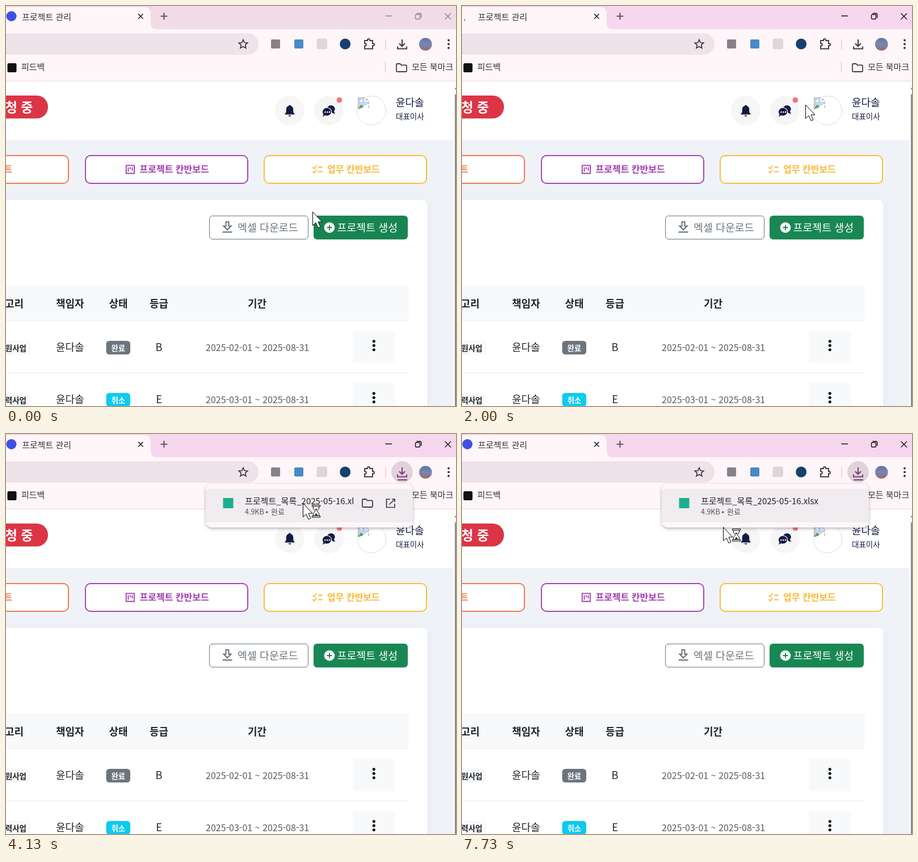
Animation of 793x706 px, one loop 8 s. Source, as an HTML page:

```html
<!DOCTYPE html>
<html lang="ko">
<head>
<meta charset="utf-8">
<title>프로젝트 관리</title>
<style>
html, body { margin: 0; width: 100%; height: 100%; overflow: hidden; background: #fff; }
svg { display: block; }
text { font-family: 'Noto Sans CJK KR', 'Noto Sans CJK', 'Noto Sans', sans-serif; white-space: pre; }
.ui { font-size: 15px; fill: #3a3237; }
.tile { font-size: 16px; font-weight: 700; }
.btn { font-size: 18.4px; }
.head { font-size: 18px; font-weight: 700; fill: #212529; }
.cell { font-size: 18px; fill: #212529; }
.tag { font-size: 13.5px; font-weight: 700; }
.date { font-size: 16px; fill: #555b61; }
.line { fill: none; stroke: #45393f; stroke-width: 2; }
.thin { stroke-width: 1.7; }
.navy { fill: #141b41; }
</style>
</head>
<body>
<svg id="stage" width="793" height="706" viewBox="0 0 793 706">
  <defs>
    <linearGradient id="photo" x1="0" y1="0" x2="0" y2="1">
      <stop offset="0" stop-color="#66739c"/><stop offset=".5" stop-color="#7188b8"/><stop offset="1" stop-color="#a5665e"/>
    </linearGradient>
    <filter id="soft" x="-20%" y="-20%" width="140%" height="140%">
      <feDropShadow dx="0" dy="2" stdDeviation="2.5" flood-color="#403038" flood-opacity=".38"/>
    </filter>
    <filter id="faint" x="-10%" y="-10%" width="120%" height="120%">
      <feDropShadow dx="0" dy="2" stdDeviation="8" flood-color="#54719c" flood-opacity=".08"/>
    </filter>
    <clipPath id="nameClip"><rect id="nameBox" x="420" y="105" width="193" height="24"/></clipPath>
    <path id="tray" d="M0-9V3M-5-2L0 3L5-2M-8 3.5V7.5H8V3.5" fill="none" stroke-width="2.1"/>
    <path id="folder" d="M0 2.2Q0 .5 1.7.5H6.5L8.7 2.8H16.3Q18 2.8 18 4.5V13Q18 14.5 16.3 14.5H1.7Q0 14.5 0 13Z" fill="none" stroke-width="1.8"/>
    <g id="save">
      <path d="M-2.5-9.5H2.5V-2H6.5L0 4.5L-6.5-2H-2.5Z" fill="none" stroke-width="2.1"/>
      <path d="M-8.5 8.5H8.5" stroke-width="2.2"/>
    </g>
    <g id="dots"><circle cy="-7.5" r="2.5"/><circle r="2.5"/><circle cy="7.5" r="2.5"/></g>
  </defs>

  <!-- page -->
  <rect y="134" width="793" height="572" fill="#fff"/>
  <rect y="236" width="788" height="470" fill="#eff3f8"/>
  <rect x="-40" y="158" width="114" height="40.5" rx="20" fill="#dc3545"/>
  <text x="47.5" y="187" text-anchor="end" font-size="23" font-weight="700" fill="#fff">청 중</text>

  <circle cx="500" cy="184.5" r="26" fill="#f6f6f6"/>
  <path class="navy" d="M500 174.5Q501.3 174.5 501.5 176Q506.3 177.3 506.3 183V187.5L508.5 190.5V191.5H491.5V190.5L493.7 187.5V183Q493.7 177.3 498.5 176Q498.7 174.5 500 174.5ZM497.5 193H502.5Q502 195 500 195Q498 195 497.5 193Z"/>
  <circle cx="569" cy="184.5" r="26" fill="#f6f6f6"/>
  <path class="navy" d="M566 180A7 6.5 0 1 1 578 186L580 190Q576 190 573.5 187.5Z"/>
  <path class="navy" stroke="#f6f6f6" stroke-width="1.2" d="M566 179.5A8 7.3 0 1 1 562.5 193.5Q560 195.7 557 195.5L559 191.5A7.8 7.5 0 0 1 566 179.5Z"/>
  <g fill="#fff"><circle cx="562.5" cy="187.3" r="1.2"/><circle cx="566.3" cy="187.3" r="1.2"/><circle cx="570.1" cy="187.3" r="1.2"/></g>
  <circle cx="587.5" cy="166" r="4.8" fill="#f8717b"/>
  <circle cx="644" cy="184.5" r="25.5" fill="#fff" stroke="#dcdcdc"/>
  <path d="M621 162H633L639 168V172L633 176L628 180L621 182Z" fill="#c5d7f4"/>
  <path d="M621 180.5L626 174L630 178L621 182Z" fill="#50a542"/>
  <path d="M621 182V162H633L639 168V180" fill="none" stroke="#a8a8a8" stroke-width="1.2"/>
  <path d="M633 162V168H639M640 173L628 182" fill="none" stroke="#fff" stroke-width="2"/>
  <circle cx="626" cy="167.5" r="2" fill="#fff"/>
  <text x="687" y="177" font-size="18" font-weight="500" fill="#141b41">윤다솔</text>
  <text x="687" y="200" font-size="13.5" fill="#141b41">대표이사</text>

  <g fill="#fff" stroke-width="2">
    <rect x="-60" y="264" width="170" height="49" rx="9" stroke="#f4784c"/>
    <rect x="140" y="264" width="286" height="49" rx="9" stroke="#a544b4"/>
    <rect x="455" y="264" width="286" height="49" rx="9" stroke="#f9bf3b"/>
  </g>
  <text class="tile" x="11" y="294" text-anchor="end" fill="#f4784c">트</text>
  <path d="M211.8 281.3H226V295.5H211.8ZM215.5 284.5V292.5M219 284.5V288M222.5 284.5V290.5" fill="none" stroke="#a03bb0" stroke-width="1.8"/>
  <text class="tile" x="235.5" y="294" fill="#a03bb0">프로젝트 칸반보드</text>
  <path d="M540.5 284.5L543 287L547.5 281.5M540.5 292L543 294.5L547.5 289M550 284.5H558M550 292.5H558" fill="none" stroke="#f9b93a" stroke-width="1.9"/>
  <text class="tile" x="566" y="294" fill="#f9b93a">업무 칸반보드</text>

  <rect x="-30" y="342" width="772.5" height="400" rx="8" fill="#fff" filter="url(#faint)"/>

  <rect x="358.5" y="370.5" width="174" height="41" rx="5.5" fill="#fff" stroke="#6c757d"/>
  <use href="#save" x="390" y="390.5" stroke="#6c757d"/>
  <text class="btn" x="408" y="398" fill="#6c757d">엑셀 다운로드</text>
  <g id="hover">
    <rect x="358" y="370" width="175" height="42" rx="6" fill="#6c757d"/>
    <use href="#save" x="390" y="390.5" stroke="#fff"/>
    <text class="btn" x="408" y="398" fill="#fff">엑셀 다운로드</text>
  </g>
  <rect id="create" x="542" y="370" width="166" height="42" rx="6" fill="#198754"/>
  <circle cx="570" cy="391" r="9.3" fill="#fff"/>
  <path d="M565.5 391H574.5M570 386.5V395.5" stroke="#198754" stroke-width="2"/>
  <text class="btn" x="583.5" y="398" fill="#fff">프로젝트 생성</text>

  <rect x="-10" y="493" width="720" height="62" rx="5" fill="#f8f9fb"/>
  <path d="M0 555.5H709M0 647.5H709" stroke="#eceef1"/>
  <text class="head" x="31" y="532" text-anchor="end">고리</text>
  <text class="head" x="88" y="532">책임자</text>
  <text class="head" x="181.5" y="532">상태</text>
  <text class="head" x="253" y="532">등급</text>
  <text class="head" x="426" y="532">기간</text>
  <g id="rows"></g>

  <rect x="788" y="134" width="5" height="572" fill="#fcfbfc"/>
  <rect x="791" y="155" width="8" height="600" rx="3" fill="#8b898b"/>
  <path d="M790.5 147L793 143.5V147Z" fill="#777"/>

  <!-- browser frame -->
  <rect id="bar" width="793" height="42" fill="#f6d7ee"/>
  <path d="M0 2H243Q255 2 255 14V30Q255 41 266 41H793V133H0Z" fill="#fef6f8"/>
  <path d="M0 132.5H793" stroke="#e9dadf"/>
  <circle id="favicon" cx="9.5" cy="18" r="9" fill="#3d50e6"/>
  <path id="spinner" fill="none" stroke="#73507a" stroke-width="2.5"/>
  <text class="ui" x="28" y="24.5">프로젝트 관리</text>
  <path d="M233 14L241.5 22.5M241.5 14L233 22.5" stroke="#2a2226" stroke-width="1.7"/>
  <path d="M272.5 18H284.5M278.5 12V24" stroke="#45393f" stroke-width="1.7"/>
  <g id="winButtons" fill="none" stroke-width="1.4">
    <path d="M668.5 17.5H680M773.5 13L784 23.5M784 13L773.5 23.5"/>
    <rect x="721.5" y="15" width="8" height="8" rx="1.5"/>
    <path d="M723.5 13H729.5Q731.7 13 731.7 15.2V21"/>
  </g>
  <rect x="-30" y="48" width="475" height="38" rx="19" fill="#efe3ea"/>
  <path class="line thin" d="M418 59.5L420.3 64.6L425.8 65.2L421.7 68.9L422.9 74.3L418 71.5L413.1 74.3L414.3 68.9L410.2 65.2L415.7 64.6Z"/>
  <rect x="467" y="59" width="16" height="16" rx="2" fill="#85828a"/>
  <rect x="508" y="59" width="16" height="16" rx="2" fill="#4a8ac6"/>
  <rect x="547.5" y="57.5" width="18.5" height="18.5" rx="2" fill="#dcd8d9"/>
  <circle cx="597.7" cy="67" r="9.5" fill="#17406e"/>
  <path class="line" d="M632 61H637V60Q637 58 639 58T641 60V61H646V66H647Q649 66 649 68T647 70H646V75.5H632V70.5Q635 70.5 635 68.2T632 66Z"/>
  <path d="M669 58.5V76.5M668.5 99.5V117.5" stroke="#f5cfe3" stroke-width="2"/>
  <circle id="toolHover" cx="698" cy="67" r="19" fill="#e0d3da"/>
  <use id="toolIcon" href="#tray" x="698" y="68"/>
  <g id="ring" fill="none" stroke="#a512b2" stroke-width="2.2">
    <circle cx="698" cy="67" r="10.5"/>
    <path d="M698 61V72M693.5 68L698 72.5L702.5 68"/>
  </g>
  <path id="underline" d="M690 81H707" stroke="#7d3b7b" stroke-width="2"/>
  <circle cx="739.3" cy="67.5" r="11.3" fill="url(#photo)"/>
  <g fill="#45393f"><circle cx="780" cy="60.5" r="2"/><circle cx="780" cy="67.3" r="2"/><circle cx="780" cy="74" r="2"/></g>
  <rect x="2.5" y="101" width="16" height="16" rx="2.5" fill="#111"/>
  <text class="ui" x="27" y="113">피드백</text>
  <use href="#folder" x="688" y="101.5" stroke="#45393f"/>
  <text class="ui" x="715" y="113">모든 북마크</text>

  <g id="flyer">
    <circle r="36.5" fill="#f4e1f0"/>
    <path d="M0-14V6M-8-2L0 6L8-2M-13 7V13.5H13V7" fill="none" stroke="#ae1bb8" stroke-width="3.6"/>
  </g>

  <g id="bubble">
    <rect x="352" y="88" width="365" height="77" rx="11" fill="#fdf7fa" filter="url(#soft)"/>
    <rect x="352" y="97" width="365" height="59" fill="#f0ecf0"/>
    <rect x="382.5" y="113" width="18" height="18" fill="#1bae8e"/>
    <text x="421" y="123.5" font-size="15" fill="#262126" clip-path="url(#nameClip)">프로젝트_목록_2025-05-16.xlsx</text>
    <text x="421" y="142" font-size="12.5" fill="#5a5258">4.9KB</text>
    <circle cx="459.7" cy="138" r="1.8" fill="#5a5258"/>
    <text x="467" y="142" font-size="13" fill="#5a5258">완료</text>
    <g id="actions">
      <use href="#folder" x="628" y="114.5" stroke="#45393f"/>
      <path class="line thin" d="M677 115H670.5V129.5H685V123M680 115H685V120M685 115L675.5 124.5"/>
    </g>
  </g>

  <g id="cursor" stroke="#000" fill="#fff" stroke-linejoin="round">
    <path id="arrow" d="M.5.5V24.5L6 19.5L10 28.5L14 26.8L10 18H17Z"/>
    <path id="hand" d="M-2 2Q-2 .5 0 .5T2 2V9Q3 7.5 4.5 8.3L5 9.5Q6.5 8.3 8 9.8Q10 9.3 10 12V17Q10 20 8 22V25H-1.5V23L-6 16Q-7 13.5-5 13.5L-2 16ZM2 9V14M5 9.5V14M8 9.8V14"/>
    <g id="busy">
      <path d="M18.5 5.5H28.5V9Q28.5 11 24.8 14Q28.5 17 28.5 19V22.5H18.5V19Q18.5 17 22.2 14Q18.5 11 18.5 9Z"/>
      <path d="M21 10.5H26L23.5 13ZM20.5 21.5L23.5 18L26.5 21.5Z" fill="#000" stroke="none"/>
      <path d="M16.5 3.5H30.5V6H16.5ZM16.5 22.5H30.5V25H16.5Z"/>
    </g>
  </g>
</svg>
<script>
const LOOP = 8000, FPS = 15;
const $ = id => document.getElementById(id);
const show = (id, on) => $(id).style.display = on ? '' : 'none';

const row = (dy, kind, state, color, grade, start) => `
  <g transform="translate(0 ${dy})">
    <rect x="-20" y="591" width="63" height="25" rx="5" fill="#f8f9fa"/>
    <text class="tag" x="36" y="609" text-anchor="end" fill="#212529">${kind}</text>
    <text class="cell" x="88" y="609">윤다솔</text>
    <rect x="176.5" y="591" width="42.5" height="24" rx="5.5" fill="${color}"/>
    <text class="tag" x="197.8" y="608.5" text-anchor="middle" fill="#fff">${state}</text>
    <text class="cell" x="269.5" y="609" text-anchor="middle">${grade}</text>
    <text class="date" x="352" y="609">${start} ~ 2025-08-31</text>
    <rect x="611" y="573" width="75" height="57.5" rx="4" fill="#f8f9fa"/>
    <use href="#dots" x="648.3" y="599.3"/>
  </g>`;
$('rows').innerHTML =
  row(0, '원사업', '완료', '#6c757d', 'B', '2025-02-01') +
  row(92, '력사업', '취소', '#0dcaf0', 'E', '2025-03-01');

// [time, x, y]
const path = [
  [0, 540, 363], [133, 508, 338], [267, 484, 368], [400, 468, 394],
  [600, 468, 394], [867, 466, 398], [1200, 470, 396], [1400, 505, 338],
  [1600, 545, 262], [1800, 590, 192], [2000, 605, 174], [2267, 617, 163],
  [3067, 623, 158], [3133, 623, 155], [3400, 610, 146], [4000, 523, 122],
  [4533, 523, 122], [4867, 535, 122], [5933, 535, 122], [6000, 531, 125],
  [6533, 507, 143], [7133, 507, 143], [7333, 470, 180], [7467, 442, 202],
  [7533, 437, 196], [7733, 460, 164]
];
const hoverFade = [[200, 0], [333, 1], [1380, 1], [1520, 0]];
const flyerFade = [[2080, .3], [2200, 1], [2900, 1], [3067, .86]];

// Linear value of column c at time t
function track(keys, t, c = 1) {
  const i = keys.findIndex(k => k[0] > t);
  if (i < 0) return keys[keys.length - 1][c];
  if (i === 0) return keys[0][c];
  const a = keys[i - 1], b = keys[i];
  return a[c] + (b[c] - a[c]) * (t - a[0]) / (b[0] - a[0]);
}

function arc(cx, cy, r, from, sweep) {
  const at = deg => {
    const a = deg * Math.PI / 180;
    return `${cx + r * Math.cos(a)} ${cy + r * Math.sin(a)}`;
  };
  return `M${at(from)}A${r} ${r} 0 ${sweep > 180 ? 1 : 0} 1 ${at(from + sweep)}`;
}

function draw(t) {
  const within = (a, b) => t >= a - 2 && t < b - 2;

  const active = t > 730;
  $('bar').setAttribute('fill', active ? '#f6d7ee' : '#f0dbe6');
  $('winButtons').setAttribute('stroke', active ? '#111' : '#8f8289');

  const loading = within(1000, 2400);
  show('favicon', !loading);
  show('spinner', loading);
  if (loading) {
    const sweep = 12 + 168 * Math.abs(Math.cos(Math.PI * (t - 1400) / 1200));
    $('spinner').setAttribute('d', arc(9.5, 18, 8.3, 170 - (t - 1400) * .085, sweep));
  }

  $('hover').style.opacity = track(hoverFade, t);
  $('create').setAttribute('fill', t < 60 ? '#188451' : '#198754');

  const ring = within(2133, 3333), open = t >= 3331;
  show('ring', ring);
  show('toolIcon', !ring);
  show('toolHover', open);
  show('underline', ring || open);
  $('toolIcon').setAttribute('stroke', open ? '#7d3b7b' : '#45393f');

  show('flyer', within(2133, 3133));
  const y = 197 + 470 * Math.exp(-(t - 2133) / 245);
  $('flyer').setAttribute('transform', `translate(697.5 ${y})`);
  $('flyer').style.opacity = track(flyerFade, t);

  const rowHover = within(4067, 7267);
  show('bubble', open);
  show('actions', rowHover);
  $('nameBox').setAttribute('width', rowHover ? 192.5 : 230);

  const hand = within(333, 1400) || within(2067, 4067);
  show('hand', hand);
  show('arrow', !hand);
  show('busy', t >= 4131);
  $('cursor').setAttribute('transform', `translate(${track(path, t)} ${track(path, t, 2)})`);
}

const begin = performance.now();
function tick() {
  const t = (performance.now() - begin) % LOOP;
  draw(Math.floor((t + 4) * FPS / 1000) * 1000 / FPS % LOOP);
  requestAnimationFrame(tick);
}
tick();
</script>
</body>
</html>
```
